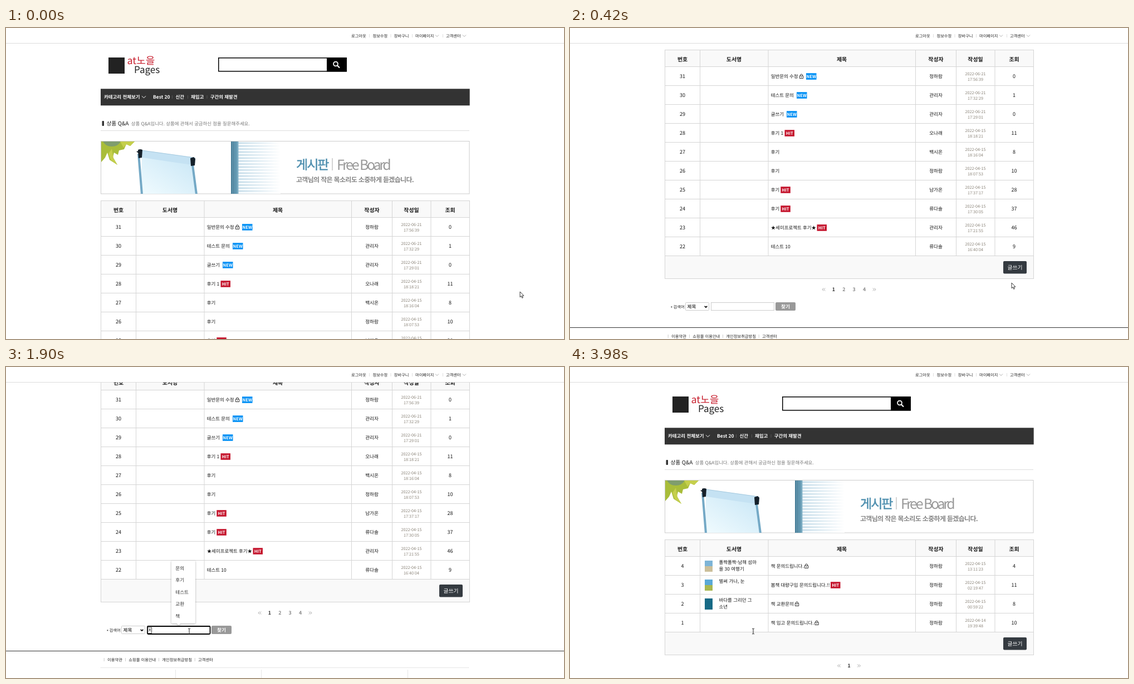
An HTML page for the animation above (5.27 s loop, 1002 by 559 pixels).

```html
<!DOCTYPE html>
<html lang="ko">
<head>
<meta charset="utf-8">
<title>상품 Q&amp;A</title>
<style>
html, body { margin: 0; width: 100%; height: 100%; overflow: hidden; background: #fff; }
svg { display: block; width: 1002px; height: 559px; }
text { font-family: "Noto Sans CJK KR", "Noto Sans CJK", "Noto Sans", sans-serif; text-rendering: geometricPrecision; white-space: pre; }
#popup { filter: drop-shadow(0 1px 1.5px rgba(0, 0, 0, .35)); }
</style>
</head>
<body>
<svg id="stage" viewBox="0 0 1002 559"></svg>
<script>
const MID = 'text-anchor="middle" ', BOLD = 'font-weight="700" ', MEDIUM = 'font-weight="500" ';
const LOOP = 5270;

// y is the visual middle of the line
const text = (x, y, s, size = 8.45, fill = '#151515', extra = '') =>
  `<text x="${x}" y="${y + size * .37}" font-size="${size}" fill="${fill}" ${extra}>${s}</text>`;
const rect = (x, y, w, h, fill, extra = '') =>
  `<rect x="${x}" y="${y}" width="${w}" height="${h}" fill="${fill}" ${extra}/>`;
const line = (d, color, width = 1, extra = '') =>
  `<path d="${d}" fill="none" stroke="${color}" stroke-width="${width}" ${extra}/>`;
const shape = (d, fill, extra = '') => `<path d="${d}" fill="${fill}" ${extra}/>`;
const chevron = (x, y, w, color, width = 1) => line(`M${x - w} ${y - w / 2}l${w} ${w}l${w} ${-w}`, color, width);
const each = (list, fn) => list.map(fn).join('');
const count = (n, fn) => Array.from({ length: n }, (_, i) => fn(i)).join('');

const defs = `<defs>
  <linearGradient id="board" x1="0" y1="1" x2="1" y2="0"><stop stop-color="#f0fbfe"/><stop offset="1" stop-color="#c8e6f6"/></linearGradient>
  <linearGradient id="fade"><stop stop-color="#fff" stop-opacity="0"/><stop offset="1" stop-color="#fff"/></linearGradient>
  <linearGradient id="post"><stop stop-color="#3f7690"/><stop offset=".35" stop-color="#6da0b8"/><stop offset=".65" stop-color="#5b93ad"/><stop offset="1" stop-color="#88b6cb"/></linearGradient>
  <clipPath id="frame">${rect(171, 204, 661, 94, '#000')}</clipPath></defs>`;

function topBar() {
  const items = [[620, '로그아웃'], [658.5, '정보수정'], [696.7, '장바구니'], [735, '마이페이지'], [790, '고객센터']];
  return rect(0, 0, 1002, 27, '#fff') + rect(0, 27, 1002, 1, '#ddd') +
    each(items, ([x, s]) => text(x, 14, s, 7.25, '#222')) +
    each([652, 690.5, 729, 784], x => rect(x, 11, 1, 6, '#ddd')) +
    chevron(774, 14, 3, '#999', .8) + chevron(823, 14, 3, '#999', .8);
}

function banner() {
  const leaves = shape('M171 204h60l-8 8-7-3-4 9-9 2-2 8-7-4-2 8 8 14-14-9-4-13-4 9-7 8z', '#a9bd3a') +
    shape('M174 204h32q-5 9-16 9t-16-9z', '#7f9d6d') +
    shape('M205 204h26l-8 8-7-3-5 6zM184 226l6-9 3 17 7 12-12-9z', '#c5cf4c');
  const flipchart = shape('M244 231L333 246L343 298H243z', 'url(#board)') +
    line('M238 226L244 299M335 246L342 299', '#74a9c6', 4) +
    shape('M240 219L340 233L339 247L239 232z', '#c5e2f3') + line('M241 219.5L338 233', '#9cc3da', .8) +
    shape('M237 219q4-2 8 0l-1 14-6 1z', '#15202a') + shape('M331 234l6-2 3 3-1 12-7 1z', '#15202a') +
    shape('M234 222l4-1v4z', '#15202a');
  const blinds = rect(417, 204, 75, 94, '#f2f8fb') +
    count(18, i => rect(417, 206 + i * 5.4, 75, 1.5, '#abcddf')) +
    rect(417, 204, 76, 94, 'url(#fade)') + rect(404, 204, 13.5, 94, 'url(#post)') +
    line('M409 204V298', '#366b84', .8);
  return rect(170.5, 203.5, 661.5, 94.5, '#fff', 'stroke="#ccc"') +
    `<g clip-path="url(#frame)">${leaves + flipchart + blinds}</g>` +
    text(521, 245.5, '게시판', 23, '#4d8eae', 'stroke="#4d8eae" stroke-width=".5" letter-spacing="-2"') +
    rect(585.5, 234, 1, 22, '#aaa') +
    text(594, 245.5, 'Free Board', 25, '#999', 'font-weight="300" letter-spacing="-3.3"') +
    text(521, 273, '고객님의 작은 목소리도 소중하게 듣겠습니다.', 12, '#858585', BOLD + 'letter-spacing="-.67"');
}

function pageTop() {
  const menu = [[176, '카테고리 전체보기'], [264, 'Best 20'], [304.5, '신간'], [332, '재입고'], [366.7, '구간의 재발견']];
  return rect(184, 53, 29, 29, '#222') +
    text(217.5, 58.5, 'at노을', 18, '#c8202f', MEDIUM) + text(230, 75, 'Pages', 17, '#222', MEDIUM) +
    rect(381.75, 53.75, 229.5, 24, '#fff', 'stroke="#000" stroke-width="1.5"') + rect(576, 53, 36, 25.5, '#000') +
    '<circle cx="592" cy="64.5" r="3.9" fill="none" stroke="#fff" stroke-width="1.8"/>' + line('M595 67.5l4 4', '#fff', 2.2) +
    rect(170, 109.3, 662.7, 30, '#333') +
    each(menu, ([x, s]) => text(x, 124, s, 8.45, '#fff', BOLD)) + chevron(247.5, 124, 3.5, '#fff') +
    each([298, 326, 360.5], x => rect(x, 121, 1, 6, '#555')) +
    rect(172.5, 167, 3.5, 9, '#333', 'rx="1"') + text(180.5, 171.5, '상품 Q&amp;A', 9.6) +
    text(224.7, 171.5, '상품 Q&amp;A입니다. 상품에 관해서 궁금하신 점을 질문해주세요.', 8.4, '#777') +
    rect(170, 184, 662, 1, '#ddd') + banner();
}

function badge(x, y, s) {
  const [width, color] = s == 'NEW' ? [18.5, '#0090f5'] : [17.5, '#c5162e'];
  return rect(x, y - 5.8, width, 11.6, color) + text(x + width / 2, y, s, 7.6, '#fff', MID + BOLD);
}

const lock = (x, y) => line(`M${x - 3.2} ${y - 1}h6.4v4.5h-6.4zM${x - 2} ${y - 1}v-1a2 2 0 0 1 4 0v1M${x} ${y + .5}v1.6`, '#222', .9);

const books = {
  4: ['#7db4d6', '#cbbf9a', '폴짝폴짝-남해 섬마', '을 30 여행기'],
  3: ['#5aa9d6', '#a9b84f', '벌써 가나, 눈', ''],
  2: ['#176a86', '#176a86', '바다를 그리던 그', '소년'],
};

function book(y, [top, bottom, a, b]) {
  return rect(242, y + 8, 14, 10, top) + rect(242, y + 18, 14, 10, bottom) +
    text(267.5, y + 10.5, a) + text(267.5, y + 22.5, b);
}

// number | title | badge | badge x | lock x | writer | date | time | views
function row(data, i) {
  const [no, title, tag, tagX, lockX, writer, date, time, views] = data.split('|');
  const y = 340 + i * 34, c = y + 18;
  return rect(170, y, 662, 1, '#d5d5d5') +
    text(202, c, no, 9, '#151515', MID) + text(360.7, c, title) +
    (tag && badge(+tagX, c, tag)) + (lockX && lock(+lockX, c)) +
    text(657, c, writer, 8.6, '#151515', MID) +
    text(728, c - 5, date, 7.2, '#8a8378', MID) + text(728, c + 5.2, time, 7.2, '#8a8378', MID) +
    text(797.5, c, views, 9, '#151515', MID) +
    (no in books ? book(y, books[no]) : '');
}

function list(rows, pages) {
  const end = 340 + rows.length * 34, y = end + 61, left = 501 - (pages - 1) * 9.2;
  const arrows = (x, d) => line(`M${x} ${y - 2.5}l${-2.5 * d} 2.5l${2.5 * d} 2.5M${x + 2.8 * d} ${y - 2.5}l${-2.5 * d} 2.5l${2.5 * d} 2.5`, '#aaa');
  const heads = [[202, '번호'], [294.5, '도서명'], [488, '제목'], [657, '작성자'], [728, '작성일'], [797.5, '조회']];
  return rect(170, 310, 662, 30, '#f9f9f9') + rect(170, end, 662, 42, '#f9f9f9') +
    each(heads, ([x, s]) => text(x, 327.5, s, 9.9, '#151515', MID + BOLD)) +
    each(rows, row) +
    each([310, end, end + 41], v => rect(170, v, 663, 1, '#d5d5d5')) +
    each([170, 832], x => rect(x, 310, 1, end - 268, '#d5d5d5')) +
    each([233, 355.5, 620, 693, 762.5], x => rect(x, 310, 1, end - 310, '#d5d5d5')) +
    rect(778, end + 10, 42, 22.5, '#343a40', 'rx="2"') + text(799, end + 21.5, '글쓰기', 9.8, '#fff', MID) +
    arrows(left - 18, 1) + arrows(left + pages * 18.4 - .4, -1) +
    count(pages, i => text(left + i * 18.4, y, i + 1, 8.8, i ? '#888' : '#333', MID + BOLD));
}

function searchAndFooter() {
  const links = [[182, '이용약관'], [220.3, '쇼핑몰 이용안내'], [280.3, '개인정보취급방침'], [345, '고객센터']];
  return rect(181.5, 771.5, 1.8, 1.8, '#333') + text(185.5, 772, '검색어', 7.35, '#222') +
    rect(207.5, 764.5, 42, 14, '#fff', 'stroke="#ccc" rx="1"') + text(210.5, 772, '제목', 8.6, '#000') +
    chevron(244, 772, 2.3, '#000', 1.5) +
    rect(253.5, 764.5, 113, 14, '#fff', 'stroke="#ccc"') +
    rect(369, 764, 36, 15, '#999', 'rx="2"') + text(387, 772, '찾기', 8.7, '#fff', MID + BOLD) +
    rect(0, 809, 1002, 1, '#333') +
    each(links, ([x, s]) => rect(x - 6.3, 822, 1, 6, '#ccc') + text(x, 825, s, 7.3, '#222')) +
    line('M170 839.5H832', '#ccc', 1, 'stroke-dasharray="1 1"') +
    each([304, 458, 721], x => rect(x, 843, 1, 40, '#e6e6e6'));
}

const allRows = [
  '31|일반문의 수정|NEW|424|415.5|정하람|2022-06-21|17:56:39|0',
  '30|테스트 문의|NEW|407||관리자|2022-06-21|17:32:29|1',
  '29|글쓰기|NEW|389||관리자|2022-06-21|17:29:01|0',
  '28|후기 1|HIT|385.5||오나래|2022-04-15|18:18:21|11',
  '27|후기||||백시온|2022-04-15|18:16:04|8',
  '26|후기||||정하람|2022-04-15|18:07:53|10',
  '25|후기|HIT|378.3||남가온|2022-04-15|17:37:17|28',
  '24|후기|HIT|378.3||류다솔|2022-04-15|17:30:05|37',
  '23|★세미프로젝트 후기★|HIT|443.5||관리자|2022-04-15|17:21:55|46',
  '22|테스트 10||||류다솔|2022-04-15|16:40:04|9',
];
const foundRows = [
  '4|책 문의드립니다.|||424.5|정하람|2022-04-15|13:11:23|4',
  '3|봄책 대량구입 문의드립니다.!!|HIT|468||정하람|2022-04-15|02:19:47|11',
  '2|책 교환문의|||407.5|정하람|2022-04-15|00:59:22|8',
  '1|책 입고 문의드립니다.|||443|정하람|2022-04-14|19:39:48|10',
];

const popup = rect(297, 348, 43, 113, '#fff', 'rx="1.5"') + shape('M306 460.5l4 3.5 4-3.5z', '#fff') +
  each(['문의', '후기', '테스트', '교환', '책'], (s, i) => text(304.3, 361.5 + i * 21.5, s, 8.6, '#333'));

const stage = document.getElementById('stage');
stage.innerHTML = defs +
  `<g id="all">${pageTop() + list(allRows, 4) + searchAndFooter()}</g>` +
  `<g id="found">${pageTop() + list(foundRows, 1)}</g>` + topBar() +
  `<g id="focus">${rect(254, 466, 112.5, 14, '#fff', 'stroke="#000" stroke-width="1.8" rx="1.5"')}
   <text id="typed" x="254.2" y="476.3" font-size="8.6" fill="#222"></text>
   ${rect(254.7, 468.2, 7, 10.3, 'none', 'id="compose" stroke="#333" stroke-width=".8"')}
   ${rect(261, 467, 1, 12, '#000', 'id="caret"')}</g>` +
  `<g id="popup">${popup}</g>` +
  shape('M0 0V9.8L2.2 7.7L3.8 11.4L5.4 10.7L3.9 7.2H6.9Z', '#fff', 'id="arrow" stroke="#222" stroke-width=".9"') +
  line('M-2 -4.8H-.6L0 -4.2L.6 -4.8H2M0 -4.2V4.2M-2 4.8H-.6L0 4.2L.6 4.8H2', '#222', 1, 'id="beam"');

// Each track holds its value from the given time on
const scroll = [[0, 0], [90, 4], [180, 17], [280, 150], [420, 271], [510, 299]];
const cursor = [[0, 923, 474], [90, 921, 474], [180, 918, 473], [280, 905, 470], [420, 793, 458], [510, 690, 455],
  [600, 560, 451], [700, 440, 448], [790, 357, 447], [870, 343, 460], [950, 329, 475, 1], [2590, 328, 474], [3980, 329, 475, 1]];
const typed = [[0, ''], [1900, 'ㅊ'], [1980, '채'], [2070, '책']];
const popupAlpha = [[0, 0], [1200, .6], [1280, 1], [2150, .5], [2230, 0]];
const at = (track, t) => track.findLast(key => key[0] <= t).slice(1);

const el = id => document.getElementById(id);
const show = (id, on) => el(id).setAttribute('visibility', on ? 'inherit' : 'hidden');

function draw(t) {
  const done = t >= 3890, [x, y, beam] = at(cursor, t);
  show('all', !done);
  show('found', done);
  el('all').setAttribute('transform', `translate(0 ${-at(scroll, t)[0]})`);
  show('focus', t >= 1120 && !done);
  show('compose', t >= 1900 && t < 2500);
  show('caret', t >= 2500 && t < 3110);
  el('typed').textContent = at(typed, t)[0];
  el('popup').style.opacity = at(popupAlpha, t)[0];
  show('arrow', !beam);
  show('beam', beam);
  for (const id of ['arrow', 'beam']) el(id).setAttribute('transform', `translate(${x} ${y})`);
}

const start = performance.now();
function tick() {
  draw((performance.now() - start) % LOOP);
  requestAnimationFrame(tick);
}
tick();
</script>
</body>
</html>
```
